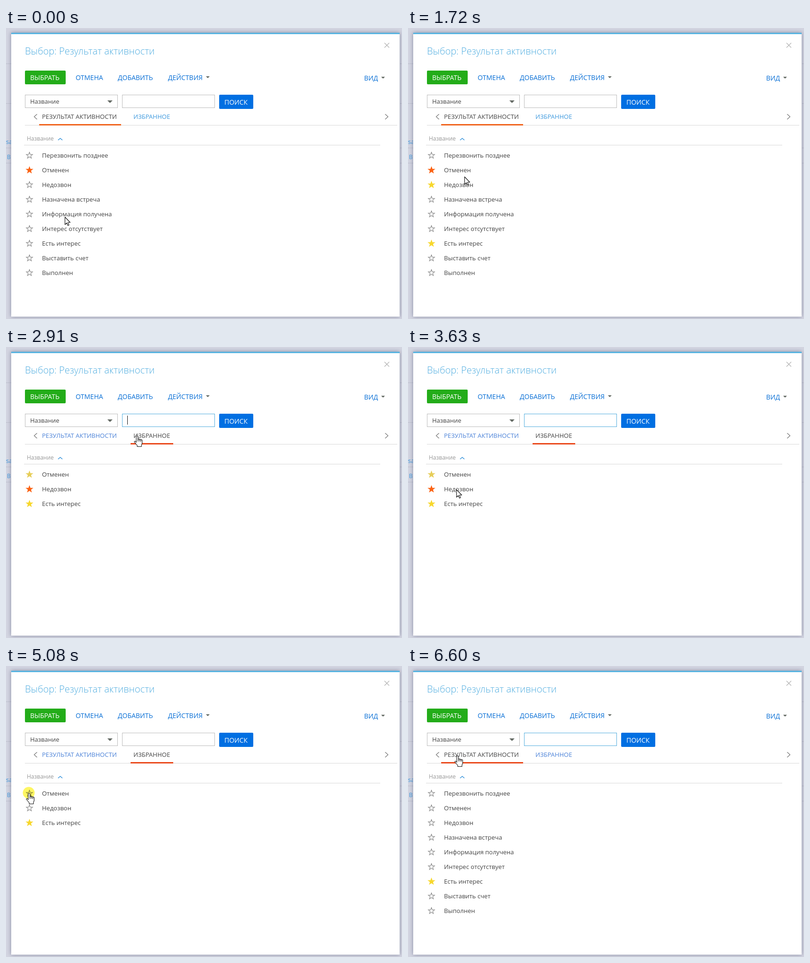
These frames come from a looping animation (836 px wide and 615 px high, 9.36 s). An HTML page:

```html
<!DOCTYPE html>
<html lang="ru">
<head>
<meta charset="utf-8">
<title>Выбор результата</title>
<style>
  html, body { margin: 0; width: 100%; height: 100%; overflow: hidden; background: #d3d5e1; }
  svg { display: block; width: 836px; height: 615px; font: 13px "Open Sans", sans-serif; fill: #444; }
  .modal { fill: #fff; filter: drop-shadow(0 0 4px rgba(70, 75, 110, .55)); }
  .dots { stroke: #a9acba; stroke-dasharray: 1 1; }
  .title { font-size: 20px; font-weight: 300; fill: #50ade0; }
  .action { font-size: 14px; fill: #0a70d6; }
  .button { font-size: 14px; fill: #fff; }
  .back { fill: #3d99de; }
  .line { fill: none; stroke: #d8d8d8; }
  .field { fill: #fff; stroke: #bcbcbc; }
  .icon { fill: none; stroke: #777; stroke-width: 1.2; }
  .drop { fill: #646a64; }
  .star { stroke-width: 1.1; stroke-linejoin: miter; }
  #ring { fill: #fdf663; mix-blend-mode: multiply; }
  #hand, #arrow { fill: #fff; stroke: #111; stroke-width: 1.1; stroke-linejoin: round; }
</style>
</head>
<body>
<svg viewBox="0 0 836 615">
  <rect width="836" height="615" fill="#d3d5e1"/>
  <path class="dots" d="M0 75.5H836M0 159.5H836M0 253.5H836M0 285.5H836"/>
  <text class="back" x="0" y="245">sa</text>
  <text class="back" x="2" y="277" font-size="12">В</text>
  <rect class="modal" x="11" y="10" width="820" height="600"/>
  <rect x="11" y="10" width="820" height="3" fill="#5ab4e0"/>
  <path class="icon" style="stroke:#b4b4b4" d="M799 31.5l10 10M809 31.5l-10 10"/>
  <text class="title" x="40" y="56">Выбор: Результат активности</text>

  <rect x="40" y="90" width="86" height="29" rx="2" fill="#23ac19"/>
  <text class="button" x="51" y="110">ВЫБРАТЬ</text>
  <text class="action" x="147" y="110">ОТМЕНА</text>
  <text class="action" x="236" y="110">ДОБАВИТЬ</text>
  <text class="action" x="342" y="110">ДЕЙСТВИЯ</text>
  <text class="action" x="756" y="111">ВИД</text>
  <path class="drop" d="M422 102h8l-4 4zM792 103h8l-4 4zM214 153h11l-5.5 5.5z"/>

  <rect class="field" x="40.5" y="141.5" width="195" height="27" style="fill:none"/>
  <text x="51" y="160">Название</text>
  <rect class="field" id="search" x="245.5" y="141.5" width="195" height="27"/>
  <rect id="caret" x="256" y="145" width="1" height="19" fill="#111"/>
  <rect x="450" y="141" width="72" height="30" rx="2" fill="#006fe2"/>
  <text class="button" x="461" y="162">ПОИСК</text>

  <path class="icon" d="M65.5 182l-6 5.5 6 5.5M800.5 182l6 5.5-6 5.5"/>
  <path class="line" d="M40 205.5H826M38 247.5H790"/>
  <text id="tabAll" x="76" y="192">РЕЗУЛЬТАТ АКТИВНОСТИ</text>
  <text id="tabFav" x="269" y="192">ИЗБРАННОЕ</text>
  <rect id="bar" y="203" height="3"/>
  <text x="44" y="238" font-size="12" style="fill:#999">Название</text>
  <path class="icon" style="stroke:#2389d8" d="M110 237l4.5-4 4.5 4"/>

  <g id="all"></g>
  <g id="fav"></g>

  <circle id="ring" r="12.5"/>
  <path id="arrow" d="M.5 .5V16.5L4.2 13 6.6 18.5 9 17.5 6.6 12H11.5z"/>
  <g id="hand">
    <path d="M5 14.5V2.5a1.8 1.8 0 0 1 3.6 0V8.6a1.5 1.5 0 0 1 3 .5 1.5 1.5 0 0 1 2.9 .8 1.4 1.4 0 0 1 2.9 1V16c0 2-1.5 3-1.5 5v2.5H7V21L1.2 14c-1-1.3 .5-2.7 2-1.5z"/>
    <path fill="none" d="M8.6 8.5v4M11.6 9v3.5M14.5 10v3"/>
  </g>
</svg>
<script>
const LOOP = 9360, TICK = 66;
const YELLOW = '#f7d72c', DULL = '#e6cd58', ORANGE = '#fb6213';
const $ = id => document.getElementById(id);

// Cursor stops: tick, x, y, easing used to get there
const path = [
  [0, 124, 399], [7, 50, 333, 'both'], [10, 49, 331], [15, 44, 450, 'both'], [17, 50, 455],
  [23, 50, 455], [26, 119, 314, 'in'], [34, 278, 187, 'out'], [43, 278, 187], [44, 276, 187],
  [58, 79, 316, 'both'], [63, 43, 306, 'out'], [67, 48, 296], [71, 48, 296],
  [75, 48, 268, 'both'], [78, 48, 268], [84, 104, 187, 'both'], [99, 104, 187], [100, 104, 189]
];
const ease = {
  in: p => p ** 1.4,
  out: p => 1 - (1 - p) ** 1.7,
  both: p => p * p * (3 - 2 * p)
};
// Click highlights: first tick, end tick
const clicks = [[23, 25], [37, 40], [70, 72], [76, 78], [85, 88]];

const starPath = Array.from({ length: 10 }, (_, i) => {
  const r = i % 2 ? 2.9 : 7, a = i * Math.PI / 5;
  return (i ? 'L' : 'M') + (r * Math.sin(a)).toFixed(2) + ' ' + (-r * Math.cos(a)).toFixed(2);
}).join('') + 'z';

function make(parent, tag, attrs) {
  const el = document.createElementNS('http://www.w3.org/2000/svg', tag);
  for (const key in attrs) el.setAttribute(key, attrs[key]);
  return parent.appendChild(el);
}

function buildList(id, names) {
  return names.map((name, i) => {
    const y = 269 + i * 31;
    make($(id), 'text', { x: 76, y: y + 5 }).textContent = name;
    return make($(id), 'path', { class: 'star', d: starPath, transform: `translate(49.5 ${y + .5})` });
  });
}

const allStars = buildList('all', ['Перезвонить позднее', 'Отменен', 'Недозвон', 'Назначена встреча',
  'Информация получена', 'Интерес отсутствует', 'Есть интерес', 'Выставить счет', 'Выполнен']);
const favStars = buildList('fav', ['Отменен', 'Недозвон', 'Есть интерес']);

function paintStar(star, color) {
  star.style.fill = color || '#fff';
  star.style.stroke = color || '#858585';
}

const show = (id, on) => { $(id).style.display = on ? '' : 'none'; };

function cursorAt(n) {
  const i = path.findIndex(stop => stop[0] > n);
  if (i < 0) return path[path.length - 1].slice(1);
  const [n0, x0, y0] = path[i - 1], [n1, x1, y1, kind] = path[i];
  const p = (n - n0) / (n1 - n0), q = kind ? ease[kind](p) : p;
  return [x0 + (x1 - x0) * q, y0 + (y1 - y0) * q].map(Math.round);
}

function isLink(x, y, rows) {
  if (y > 178 && y < 201) return x > 70 && x < 353;
  const row = Math.round((y - 269) / 31);
  return x > 40 && x < 58 && row >= 0 && row < rows && Math.abs(y - 269 - row * 31) < 10;
}

function render(t) {
  const n = Math.floor(t / TICK + .1);
  const favTab = n >= 40 && n < 88, favList = n >= 41 && n < 89;

  show('all', !favList);
  show('fav', favList);
  allStars.forEach((star, i) => {
    const color = i === 1 && n < 89 ? ORANGE
      : i === 2 && n >= 9 && n < 89 ? YELLOW
      : i === 6 && n >= 23 ? YELLOW : null;
    paintStar(star, color);
  });
  paintStar(favStars[0], n < 77 && DULL);
  paintStar(favStars[1], n < 71 && ORANGE);
  paintStar(favStars[2], YELLOW);

  const link = n < 40 ? '#3d99de' : '#4b82d8';
  $('tabAll').style.fill = favTab ? link : '#444';
  $('tabFav').style.fill = favTab ? '#444' : link;
  $('bar').setAttribute('x', favTab ? 263 : 70);
  $('bar').setAttribute('width', favTab ? 90 : 173);
  $('bar').style.fill = n < 40 ? '#f0651f' : '#ea4a1d';

  const focused = n >= 41 && n < 70 || n >= 88;
  const blink = n >= 88 ? t < 6340 : Math.floor((t - 2720) / 530) % 2 === 0;
  $('search').style.stroke = focused ? '#55aede' : '';
  show('caret', focused && blink);

  const [x, y] = cursorAt(n);
  const hand = isLink(x, y, favList ? 3 : 9);
  show('hand', hand);
  show('arrow', !hand);
  $('hand').setAttribute('transform', `translate(${x - 6} ${y})`);
  $('arrow').setAttribute('transform', `translate(${x} ${y})`);
  show('ring', clicks.some(([from, to]) => n >= from && n < to));
  $('ring').setAttribute('transform', `translate(${x} ${y})`);
}

const start = performance.now();
function loop() {
  render((performance.now() - start) % LOOP);
  requestAnimationFrame(loop);
}
loop();
</script>
</body>
</html>
```
